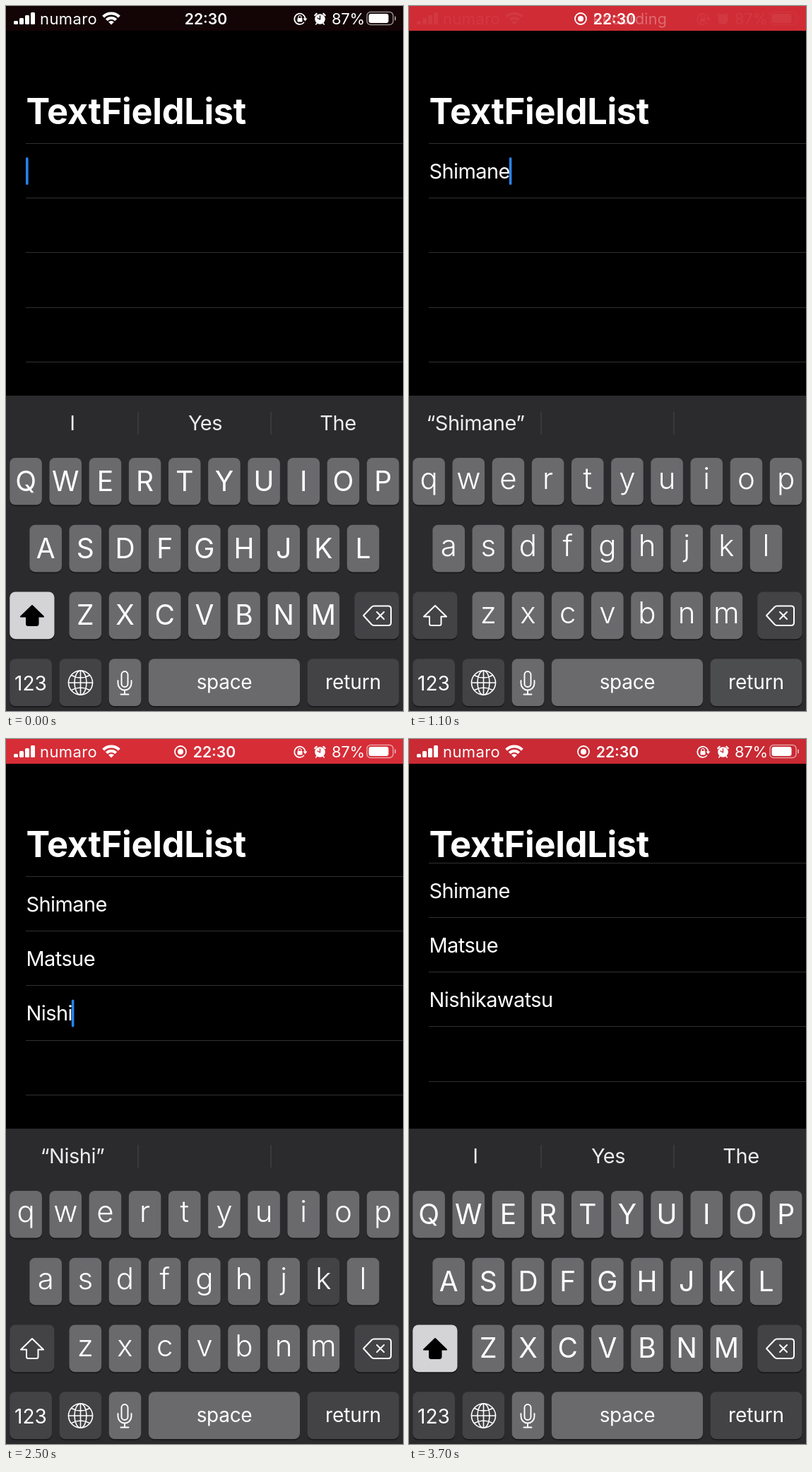
Animation of 562x997 px, one loop 3800 ms. Source, as an HTML page with a canvas:

```html
<!DOCTYPE html>
<html lang="en">
<head>
<meta charset="utf-8">
<title>TextFieldList</title>
<style>
html, body { margin: 0; height: 100%; overflow: hidden; background: #000; }
canvas { display: block; }
</style>
</head>
<body>
<canvas id="stage" width="562" height="997"></canvas>
<script>
const ctx = document.getElementById('stage').getContext('2d');
const STEP = 100, LOOP = 3800;
const PT = 997 / 568; // pixels per layout point
const WHITE = '#fff', KEY = '#6a696c', DARK = '#434245', BOARD = '#2b2a2c';
const ROW_H = 77.2, LIST_TOP = 194;

// Typing script: [first step, row, text, pressed key]
const script = [
  [0, 0, '', ''], [1, 0, '', 'S'], [2, 0, 'S', ''], [3, 0, 'S', 'h'], [4, 0, 'Sh', ''],
  [5, 0, 'Sh', 'i'], [6, 0, 'Shi', 'm'], [7, 0, 'Shim', 'a'], [8, 0, 'Shima', 'n'],
  [9, 0, 'Shiman', 'e'], [10, 0, 'Shimane', 'return'], [11, 0, 'Shimane', 'released'],
  [12, 1, 'M', ''], [13, 1, 'M', 'a'], [14, 1, 'Ma', 't'], [15, 1, 'Mat', 's'],
  [16, 1, 'Mats', 'u'], [17, 1, 'Matsu', 'e'], [18, 1, 'Matsue', ''],
  [19, 2, '', ''], [20, 2, '', 'N'], [21, 2, 'N', 'i'], [22, 2, 'Ni', 's'], [23, 2, 'Nis', 'h'],
  [24, 2, 'Nish', 'i'], [25, 2, 'Nishi', 'k'], [26, 2, 'Nishik', 'a'], [27, 2, 'Nishika', 'w'],
  [28, 2, 'Nishikaw', 'a'], [29, 2, 'Nishikawa', 't'], [30, 2, 'Nishikawat', 's'],
  [31, 2, 'Nishikawats', 'u'], [32, 2, 'Nishikawatsu', ''], [33, 2, 'Nishikawatsu', 'return'],
  [34, 3, '', ''], [35, 4, '', '']
];
const done = ['Shimane', 'Matsue', 'Nishikawatsu'];
const guesses = {
  '': ['I', 'Yes', 'The'], S: ['So', 'She'], Sh: ['She', 'Should'],
  Shi: ['Shimane', 'Shipping'], Shim: ['Shimane'], Shima: ['Shimane'], Shiman: ['Shimane'],
  M: ['My', 'Maybe'], Ma: ['Maybe', 'Make'], Mat: ['Match', 'Matter'],
  Mats: ['Matsue'], Matsu: ['Matsue'], N: ['No', 'Nice'], Ni: ['Nice', 'Night']
};

// Straight interpolation through [step, value] points
function track(points, k) {
  let [k0, v0] = points[0];
  for (const [k1, v1] of points) {
    if (k <= k1) return k1 === k0 ? v1 : v0 + (v1 - v0) * (k - k0) / (k1 - k0);
    [k0, v0] = [k1, v1];
  }
  return v0;
}
const glow = [[0, .08], [2, .85], [6, 1], [11, .875], [16, .845], [21, .98], [25, .9], [29, .87], [33, .98], [37, .845]];
const statusAlpha = [[0, 1], [1, .5], [2, 0], [10, 0], [11, .06], [12, .6], [13, 1]];
const timeAlpha = [[0, 1], [1, .5], [2, 0], [9, 0], [10, .3], [11, 1]];
const recAlpha = [[0, 0], [1, .3], [2, 1], [9, 1], [10, .8], [11, .3], [12, 0]];
const slide = [[0, 0], [9, 0], [10, 7], [11, 16], [12, 20]];

function text(s, x, y, size, { weight = 400, align = 'left', gap = 0, color = WHITE } = {}) {
  ctx.font = `${weight} ${size}px Inter, "Liberation Sans", sans-serif`;
  ctx.letterSpacing = gap + 'px';
  ctx.textAlign = align;
  ctx.fillStyle = color;
  ctx.fillText(s, x, y);
  return ctx.measureText(s).width;
}
function rect(x, y, w, h, color, r = 0) {
  ctx.fillStyle = color;
  ctx.beginPath();
  ctx.roundRect(x, y, w, h, r);
  ctx.fill();
}
function line(d, width = 2, color = WHITE) {
  ctx.lineWidth = width;
  ctx.strokeStyle = color;
  ctx.lineCap = ctx.lineJoin = 'round';
  ctx.stroke(new Path2D(d));
}
function ring(x, y, r, width) {
  ctx.lineWidth = width;
  ctx.strokeStyle = WHITE;
  ctx.beginPath();
  ctx.arc(x, y, r, 0, 7);
  ctx.stroke();
}
function dot(x, y, r) { rect(x - r, y - r, 2 * r, 2 * r, WHITE, r); }

function statusIcons(bg) {
  [5, 9, 13, 17].forEach((h, i) => rect(11 + 8 * i, 26 - h, 6, h, WHITE, 1.5));
  text('numaro', 48, 26, 22, { gap: .4 });
  ctx.lineCap = 'butt';
  ctx.strokeStyle = WHITE;
  [[16, 4.2], [9.5, 4.2], [2.8, 5.6]].forEach(([r, w]) => {
    ctx.lineWidth = w;
    ctx.beginPath();
    ctx.arc(149, 26.5, r, -Math.PI * .75, -Math.PI * .25);
    ctx.stroke();
  });
  // rotation lock
  line('M421.5 23.5A7.6 7.6 0 1 1 423.5 18', 1.7);
  ctx.fillStyle = WHITE;
  ctx.fill(new Path2D('M420.5 17.5h6l-3 4z'));
  rect(412.5, 17, 7, 5.5, WHITE, 1);
  line('M414 17v-1.5a2 2 0 0 1 4 0v1.5', 1.2);
  // alarm
  dot(444.5, 18.5, 7.3);
  line('M437.3 13.2l2.4-2.4M451.7 13.2l-2.4-2.4', 2.2);
  line('M440 24.5l-1.3 1.5M449 24.5l1.3 1.5', 1.6);
  line('M444.5 14v5l-3.5-2', 1.4, bg);
  text('87%', 461, 26, 22, { gap: -.3 });
  ctx.lineWidth = 1.5;
  ctx.strokeStyle = 'rgba(255,255,255,.55)';
  ctx.beginPath();
  ctx.roundRect(511, 8.5, 37, 18, 5);
  ctx.stroke();
  rect(513.5, 11, 28, 13, WHITE, 3);
  rect(550, 14.5, 2, 6, 'rgba(255,255,255,.55)', 1);
}

function header(k) {
  const v = track(glow, k), bg = `rgb(${238 * v},${50 * v},${61 * v})`;
  const dx = track(slide, k), rec = track(recAlpha, k);
  rect(0, 0, 562, 35, bg);
  ctx.globalAlpha = track(statusAlpha, k);
  statusIcons(bg);
  ctx.globalAlpha = rec;
  text('Recording', 244 + dx, 26, 21.5, { gap: .2 });
  ctx.globalAlpha = k > 9 ? 1 : rec;
  ring(227 + dx, 18, 8, 1.8);
  dot(227 + dx, 18, 4);
  ctx.globalAlpha = track(timeAlpha, k);
  text('22:30', k < 9 ? 283 : 275 + dx, 26, 21.2, { weight: 600, align: 'center' });
  ctx.globalAlpha = 1;
}

function list(k, row, typed) {
  const top = LIST_TOP - track([[34, 0], [36, 19.3]], k);
  for (let i = 0; i < 5; i++) {
    const y = top + i * ROW_H, s = i < row ? done[i] || '' : i === row ? typed : '';
    rect(28, Math.round(y), 534, 1, '#303032');
    const w = text(s, 28.5, y + 50, 29, { gap: -.6 });
    if (i === row && k < 37) rect(28 + (s ? w - .5 : 0), y + 20, 3.6, 39, '#2a82ea', 1.8);
  }
  text('TextFieldList', 28.5, 167, 50.5, { weight: 700, gap: -.3 });
}

// Place and width in points
function key(x, y, w, color) {
  const box = [x, y, w, 38].map(n => n * PT);
  ctx.save();
  ctx.translate(0, 1.8);
  rect(...box, '#19181a', 8);
  ctx.restore();
  rect(...box, color, 8);
}

function keyboard(typed, pressed) {
  const caps = typed === '';
  rect(0, 551, 562, 446, BOARD);
  const words = guesses[typed] || [];
  (caps ? words : [`“${typed}”`, ...words]).forEach((s, i) =>
    text(s, 94 + 188 * i, 600, 29, { align: 'center', gap: -.5, color: '#ececee' }));
  rect(186.5, 574, 1, 32, '#4a494c');
  rect(374.5, 574, 1, 32, '#4a494c');

  [['QWERTYUIOP', 3], ['ASDFGHJKL', 19], ['ZXCVBNM', 51]].forEach(([row, x0], r) => {
    [...row].forEach((c, i) => {
      const x = x0 + 32 * i, y = 364 + 54 * r, s = caps ? c : c.toLowerCase();
      key(x, y, 26, s === pressed ? DARK : KEY);
      text(s, (x + 13) * PT, y * PT + (caps ? 47 : 44.5), caps ? 39 : 42, { weight: caps ? 400 : 300, align: 'center' });
    });
  });

  key(3, 472, 36, caps ? '#d4d3d6' : DARK);
  const arrow = 'M37 848L53 863.5H45.5V873.5Q45.5 876 43 876H31.5Q29 876 29 873.5V863.5H21Z';
  line(arrow, 2, caps ? '#000' : WHITE);
  if (caps) {
    ctx.fillStyle = '#000';
    ctx.fill(new Path2D(arrow));
  }
  key(281, 472, 36, DARK);
  line('M506 862L517.5 850Q519 848.5 521 848.5H541Q545 848.5 545 852.5V872Q545 876 541 876H521Q519 876 517.5 874.5ZM525 857l10 10M535 857l-10 10');

  key(3, 526, 34, DARK);
  text('123', 35, 968, 28, { align: 'center' });
  key(43, 526, 34, DARK);
  ring(105.5, 957, 17, 1.6);
  line('M105.5 940v34M88.5 957h34M105.5 940a8.5 17 0 0 0 0 34a8.5 17 0 0 0 0-34M92.5 946.5q13 7 26 0M92.5 967.5q13-7 26 0', 1.6);
  key(83, 526, 26, KEY);
  line('M163.5 945.5a4.5 4.5 0 0 1 9 0v13a4.5 4.5 0 0 1-9 0zM158.5 954v4a9.5 9.5 0 0 0 19 0v-4M168 968v5M162.5 973.5h11', 1.9);
  key(115, 526, 122, KEY);
  text('space', 309, 965.7, 28, { align: 'center', gap: -.3 });
  key(243, 526, 74, { return: KEY, released: '#4c4d4f' }[pressed] || DARK);
  text('return', 491.5, 965.7, 28, { align: 'center', gap: -.1 });
}

function draw(now) {
  const k = Math.floor(now % LOOP / STEP);
  const [, row, typed, pressed] = script[Math.min(k, script.length - 1)];
  rect(0, 0, 562, 997, '#000');
  list(k, row, typed);
  keyboard(typed, pressed);
  header(k);
}

const start = performance.now();
function tick() {
  draw(performance.now() - start);
  requestAnimationFrame(tick);
}
tick();
</script>
</body>
</html>
```
